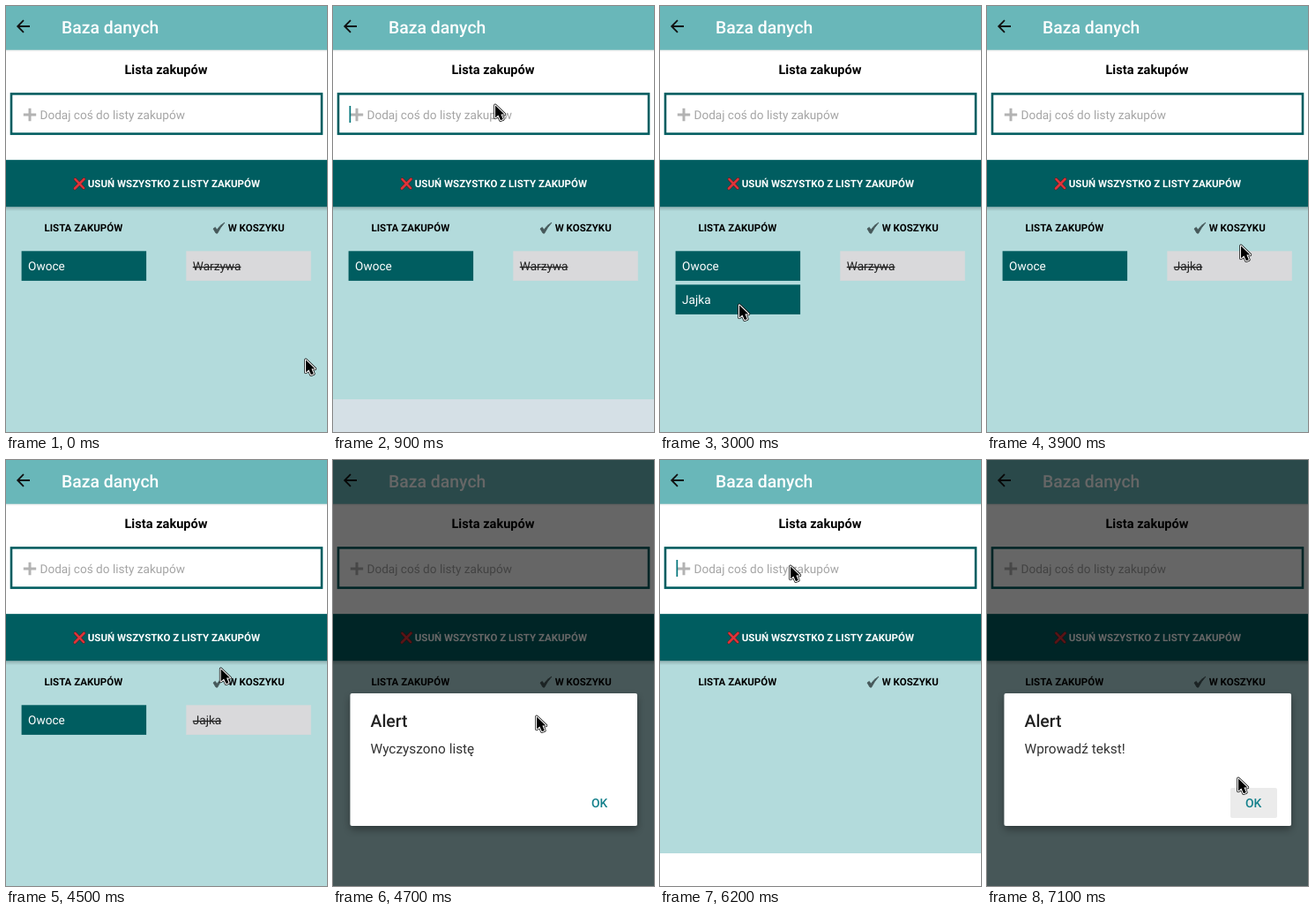
Animation, 364 px wide and 482 px high, one loop 7.2 s. Source, as an HTML page:

```html
<!DOCTYPE html>
<html lang="pl">
<head>
<meta charset="utf-8">
<title>Lista zakupów</title>
<style>
html, body { margin: 0; width: 100%; height: 100%; overflow: hidden; background: #fff; }
svg {
  display: block; width: 364px; height: 482px;
  font-family: Roboto, sans-serif; font-size: 13.6px; text-rendering: geometricPrecision;
}
.bold { font-weight: 700; font-size: 11.5px; }
.medium { font-weight: 500; }
.big { font-size: 19.4px; }
.done { text-decoration: line-through; }
</style>
</head>
<body>
<svg viewBox="0 0 364 482">
  <defs>
    <linearGradient id="shade" x2="0" y2="1">
      <stop stop-color="#000" stop-opacity=".2"/>
      <stop offset="1" stop-color="#000" stop-opacity="0"/>
    </linearGradient>
    <filter id="lift" x="-10%" y="-10%" width="120%" height="130%">
      <feDropShadow dx="0" dy="4" stdDeviation="5" flood-opacity=".35"/>
    </filter>
    <path id="arrow" d="M2 1.5V15.5L5.4 12.6L8 18.2L10.8 17L8.4 11.5H12.4Z"/>
    <path id="cross" d="M78.5 196L88 206M88.5 195.8L78 206.5" stroke-linecap="round"/>
  </defs>

  <rect width="364" height="482" fill="#b3dbdc"/>
  <rect y="49.6" width="364" height="124.6" fill="#fff"/>
  <rect width="364" height="49.6" fill="#69b7b9"/>
  <rect y="49.6" width="364" height="3" fill="url(#shade)" opacity=".4"/>
  <path d="M27 23H13.5M20 16.2L13.2 23L20 29.8" fill="none" stroke="#111" stroke-width="1.8"/>
  <text class="medium big" x="63" y="30.5" fill="#fff">Baza danych</text>
  <text class="bold" x="181.5" y="77" text-anchor="middle" style="font-size:14.6px">Lista zakupów</text>

  <rect x="6" y="99.4" width="352" height="45.2" fill="#fff" stroke="#005d60" stroke-width="2.6"/>
  <g id="hint">
    <path d="M27 115.8V130.2M19.8 123H34.2" stroke="#b3b3b3" stroke-width="3"/>
    <text x="38.5" y="127.5" fill="#a5a5a5">Dodaj coś do listy zakupów</text>
  </g>
  <text id="typed" x="19" y="127.5"/>
  <rect id="caret" x="18.5" y="113" width="1.7" height="19" fill="#00757a"/>

  <rect y="174.2" width="364" height="53" fill="#005d60"/>
  <rect y="227.2" width="364" height="5" fill="url(#shade)"/>
  <use href="#cross" stroke="#5a2225" stroke-width="3.6"/>
  <use href="#cross" stroke="#e0343a" stroke-width="2.5"/>
  <text class="bold" x="92.8" y="205" fill="#fff">USUŃ WSZYSTKO Z LISTY ZAKUPÓW</text>
  <text class="bold" x="43.5" y="255">LISTA ZAKUPÓW</text>
  <path d="M235 252L237.3 250.4L239.2 253.2Q242.5 247.8 248 245Q243 250.5 239.7 257.2L238 257Z" fill="#46585a" stroke="#46585a" stroke-width=".8"/>
  <text class="bold" x="251.7" y="255">W KOSZYKU</text>

  <g id="items"></g>
  <rect id="strip" width="364" height="37"/>
  <rect id="dim" width="364" height="482"/>

  <g id="alert">
    <rect x="19.5" y="264" width="325.5" height="150" rx="2" fill="#fff" filter="url(#lift)"/>
    <text class="medium big" x="42.5" y="302" fill="#222">Alert</text>
    <text id="message" x="42.5" y="331.5" fill="#333" style="font-size:15.4px"/>
    <rect id="press" x="276" y="371" width="53" height="34" rx="2" fill="#ebebeb"/>
    <text class="medium" x="293" y="393" fill="#15818c" style="font-size:13.9px">OK</text>
  </g>

  <g id="cursor" stroke-linejoin="round">
    <use href="#arrow" stroke="#000" stroke-width="3.6"/>
    <use href="#arrow" stroke="#fff" stroke-width="2.2"/>
    <use href="#arrow"/>
  </g>
</svg>
<script>
const LOOP = 7200, STEP = 100, TRAVEL = 300;
const $ = id => document.getElementById(id);
const within = (t, a, b) => t >= a && t < b;
const ramp = (t, a, b) => Math.min(1, Math.max(0, (t - a) / (b - a)));
const show = (el, on) => el.setAttribute("visibility", on ? "visible" : "hidden");

// Pointer stops: each is reached at time t after a move of at most TRAVEL
const stops = [
  { t: 0, x: 338, y: 399 },
  { t: 400, x: 182, y: 111 },
  { t: 3000, x: 88, y: 337 },
  { t: 3600, x: 286, y: 290 },
  { t: 3900, x: 286, y: 270 },
  { t: 4300, x: 248, y: 208 },
  { t: 4700, x: 229, y: 289 },
  { t: 5000, x: 300, y: 382 },
  { t: 5500, x: 236, y: 242 },
  { t: 5800, x: 146, y: 119 },
  { t: 6800, x: 174, y: 161 },
  { t: 7000, x: 288, y: 378 },
  { t: 7100, x: 283, y: 359 }
];

function pointer(t) {
  let { x, y } = stops[0];
  for (let i = 1; i < stops.length; i++) {
    const s = stops[i], p = ramp(t, Math.max(stops[i - 1].t, s.t - TRAVEL), s.t);
    x += (s.x - x) * p;
    y += (s.y - y) * p;
  }
  return [x, y];
}

function add(parent, tag, attrs) {
  const el = document.createElementNS("http://www.w3.org/2000/svg", tag);
  for (const k in attrs) el.setAttribute(k, attrs[k]);
  return parent.appendChild(el);
}

function item(label, done, row, from, to) {
  const g = add($("items"), "g", { transform: `translate(${done ? 204.3 : 17.6} ${277.3 + row * 38})` });
  add(g, "rect", { width: 141.5, height: 33.6, fill: done ? "#d9d9db" : "#005d60" });
  add(g, "text", { x: 7.5, y: 22.2, fill: done ? "#222" : "#fff", class: done ? "done" : "" })
    .textContent = label;
  return { g, from, to };
}

const ADDED = 2300, MOVED = 3200, REMOVED = 3800, CLEARED = 4600;
const items = [
  item("Owoce", false, 0, 0, CLEARED),
  item("Warzywa", true, 0, 0, REMOVED),
  item("Jajka", false, 1, ADDED, MOVED),
  item("Jajka", true, 1, MOVED, REMOVED),
  item("Jajka", true, 0, REMOVED, CLEARED)
];

function draw(t) {
  for (const i of items) show(i.g, within(t, i.from, i.to));

  const count = within(t, 1500, 2000) ? Math.floor((t - 1400) / STEP) : 0;
  $("typed").textContent = "Jajka".slice(0, count);
  show($("hint"), !count);
  show($("caret"), count || within(t, 600, 1100) || within(t, 6100, 6500));
  $("caret").setAttribute("x", 18.5 + (count ? $("typed").getComputedTextLength() + 1 : 0));

  const rise = ramp(t, 600, 700) - ramp(t, 2000, 2200) + ramp(t, 6100, 6200) - ramp(t, 6400, 6600);
  $("strip").setAttribute("y", 482 - 37 * rise ** 2);
  $("strip").setAttribute("fill", within(t, 700, 800) || within(t, 6200, 6300) ? "#fff" : "#d5e0e6");

  const dim = ramp(t, 4500, 4700) - ramp(t, 5300, 5600) + ramp(t, 6500, 6700);
  $("dim").setAttribute("opacity", .6 * dim);
  $("alert").setAttribute("opacity", within(t, 5500, 6500) ? 0 : dim);
  $("message").textContent = t < 6000 ? "Wyczyszono listę" : "Wprowadź tekst!";
  show($("press"), within(t, 5100, 5500) || t >= 7100);

  $("cursor").setAttribute("transform", `translate(${pointer(t)})`);
}

const start = performance.now();
function tick() {
  const t = (performance.now() - start) % LOOP;
  draw(Math.floor(t / STEP) * STEP);
  requestAnimationFrame(tick);
}
tick();
</script>
</body>
</html>
```
